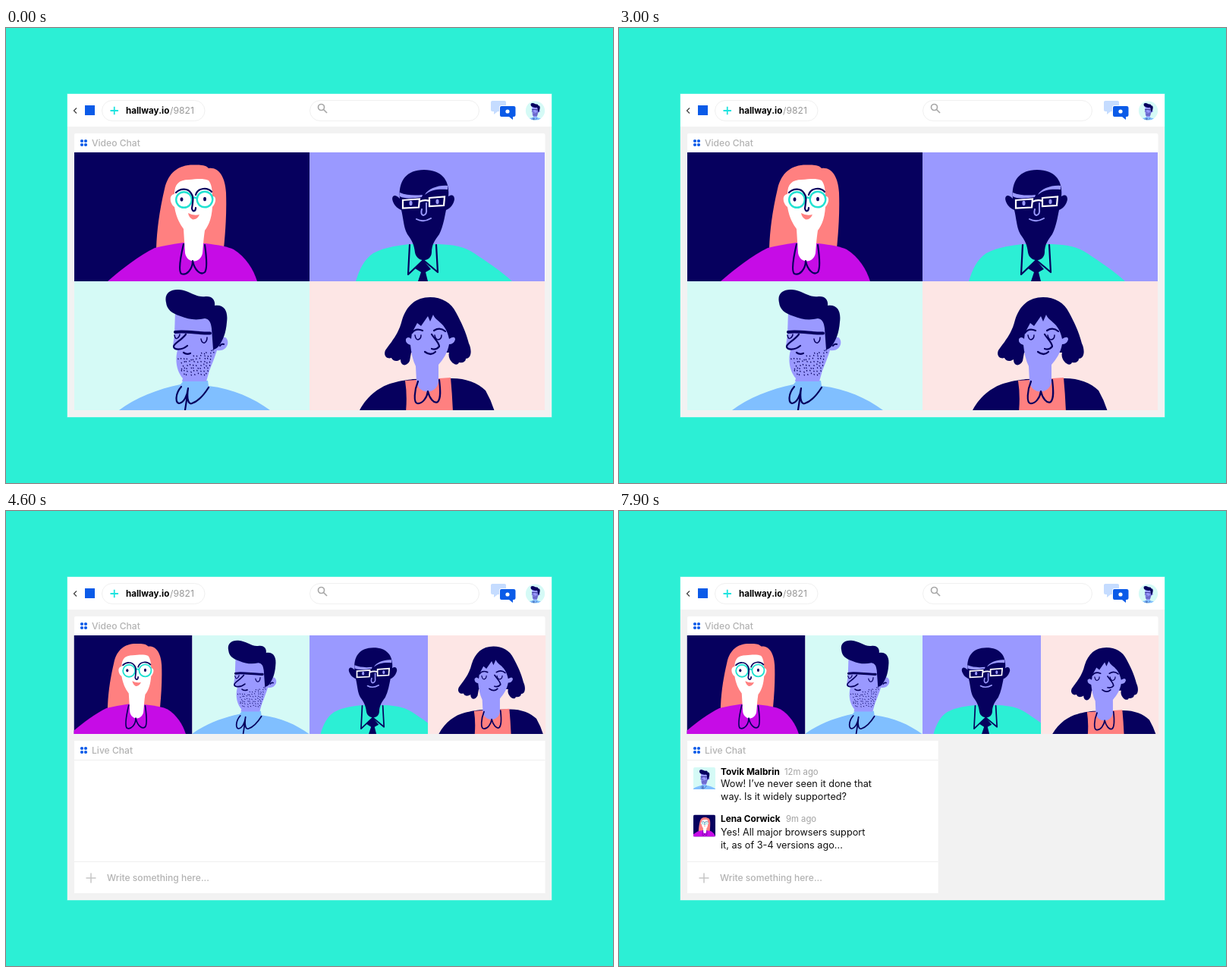
An HTML page that plays this animation: 800x600 px, repeating every 8000 ms.

```html
<!DOCTYPE html>
<html lang="en">
<head>
<meta charset="utf-8">
<title>Video and live chat</title>
<style>
  html, body { margin: 0; width: 100%; height: 100%; overflow: hidden; background: #2cefd5; }
  #stage { display: block; width: 800px; height: 600px; }
  text { font-family: Inter, "Open Sans", sans-serif; font-size: 12.7px; fill: #111; }
  .label { font-size: 12.1px; font-weight: 500; fill: #b3b3b3; }
  .name { font-size: 11.8px; font-weight: 700; fill: #000; }
  .time { font-size: 11.3px; fill: #a3a3a3; }
  .line { fill: none; stroke: #06005e; stroke-width: 2.2; stroke-linecap: round; stroke-linejoin: round; }
  .bold { stroke-width: 4; }
  .fine { stroke-width: 1.5; }
  .hairs { stroke-width: 1.2; }
  .navy { fill: #06005e; }
  .skin { fill: #9a99ff; }
</style>
</head>
<body>
<svg id="stage" viewBox="0 0 800 600">
  <defs>
    <clipPath id="round"><circle cx="697.5" cy="109" r="12.6"/></clipPath>
    <clipPath id="panelClip"><rect x="90" y="130" width="622" height="374"/></clipPath>
    <g id="dots" fill="#0b5be8">
      <circle cx="100" cy="149" r="2.1"/><circle cx="105" cy="149" r="2.1"/>
      <circle cx="100" cy="154" r="2.1"/><circle cx="105" cy="154" r="2.1"/>
    </g>

    <g id="redhead">
      <path fill="#ff8080" d="M198 291C199 262 203 238 209 212C214 190 228 180 248 180.500C257 180 264 181 267 185C280 183 289 196 290 217C291 245 289 270 287 291Z"/>
      <path fill="#c60ce6" d="M134 334C152 318 176 300 196 290Q213 286 234 283L262 284Q290 287 300 292C316 302 326 318 331 334Z"/>
      <path fill="#fff" d="M222 219C222 206 228 200 241 200C252 199 260 198 267 201C271 206 272 214 272 222C278 221 277 231 272 236C271 250 268 259 262 267C260 280 260 288 259 297C256 311 239 311 236 297L234 265C228 257 224 248 222 236C216 232 214 220 222 219Z"/>
      <path class="line" d="M234 285C230 302 227 320 231 324C238 327 246 318 246 307C248 318 256 327 262 322C266 317 264 300 262 286"/>
      <g id="specs">
        <path fill="none" stroke="#22e2d2" stroke-width="2.400" d="M245 225Q248 222 252 225"/>
        <g fill="#fff" stroke="#22e2d2" stroke-width="2.400">
          <circle cx="234.500" cy="226.500" r="10.300"/><circle cx="262" cy="226" r="10.300"/>
        </g>
        <path class="line" d="M224 217C230 211 240 211 244 218C248 223 246 230 245 238C246 243 250 242 250 237M250 220C253 210 266 210 271 216"/>
        <ellipse class="navy" cx="231.500" cy="226" rx="2" ry="2.700"/>
        <ellipse class="navy" cx="262" cy="225.500" rx="2" ry="2.700"/>
      </g>
      <path fill="#ff8080" d="M240 244Q247 248 255 246Q252 253 246 252.500Q241 250 240 244Z"/>
    </g>

    <g id="bald">
      <path fill="#2cefd5" d="M461 334C466 318 472 305 484 297C500 288 518 287 532 285H570C590 286 604 288 617 297C632 307 652 320 667 334Z"/>
      <path class="navy" d="M519 225C512 217 507 222 510 229C513 236 517 238 521 240C524 252 524 264 529 272C535 280 538 286 539 296C541 309 560 310 561 296C561 286 565 280 571 272C576 262 578 250 580 240C586 238 590 232 591 226C591 219 586 220 583 222C585 204 577 187 551 187C525 187 517 205 519 225Z"/>
      <path class="line" d="M532 286L530 325L550 306L569 322L567 286"/>
      <path class="navy" d="M539 317L550 306L560 318L553 322L556 334H543L547 322Z"/>
      <path class="skin" d="M519 217C528 221 540 221 549 220L548 223C538 224 526 226 519 222ZM552 220C556 212 570 207 582 208V213C570 212 560 213 552 220Z"/>
      <path fill="none" stroke="#fff" stroke-width="2.200" d="M523 227L545 225.500L544 236.500L523 237.500ZM558 224L578 222.500L577 234L558 235ZM545 229Q551 226 558 228"/>
      <ellipse class="skin" cx="533.500" cy="231" rx="2" ry="3.200"/>
      <ellipse class="skin" cx="568.500" cy="229" rx="2" ry="3.200"/>
      <g fill="none" stroke="#9a99ff" stroke-width="2" stroke-linecap="round">
        <path d="M548 239Q546 246 550 247Q555 246 554 239V231"/><path d="M541 252Q550 257 560 251"/>
      </g>
    </g>

    <g id="quiff">
      <path fill="#80bfff" d="M149 504C170 488 200 476 230 470L234 465H266L267 472C300 476 326 488 348 504Z"/>
      <path class="skin" d="M223 374L222 404L220 419Q219 424 226 425C222 440 226 454 233 462L232 466H264L268 452C272 442 276 432 278 425C290 427 295 416 291 410C289 406 284 408 281 413L276 378Z"/>
      <path class="navy" d="M211 362C208 349 218 344 228 345C242 346 250 356 263 354C272 353 276 359 275 366C288 364 293 374 291 388C290 402 286 412 280 420Q276 424 273 424L271 396C270 388 268 384 262 383C250 386 240 384 230 380C218 376 212 371 211 362Z"/>
      <path class="line" d="M282 419Q284 416 287 417"/>
      <path class="line bold" d="M223 401C236 399 255 403 269 402.500"/>
      <path class="line" d="M237 404C231 412 221 416 221 420C221 425 232 425 239 419"/>
      <path id="lids" class="line fine" d="M222 405Q223 411 226 409Q229 407 229 404M257 410Q258 416 262 415Q265 413 265 408"/>
      <path id="grin" class="line" d="M234 428Q238 431 243 429"/>
      <path id="stubble" class="line hairs"/>
      <path class="line" d="M231 473C223 482 223 494 228 495C235 494 239 484 240 475C238 488 240 497 245 495C254 492 262 482 267 474M239 484L236 504"/>
    </g>

    <g id="bob"><g id="dip">
      <path class="navy" d="M559 355C540 355 528 366 522 385C517 405 508 413 500 425C497 432 502 437 508 435C510 440 516 440 520 437C520 446 528 447 532 439L534 428H584C581 438 594 449 597 441C602 442 606 440 606 436C614 436 614 424 610 416C606 400 600 388 593 375C587 362 574 355 559 355Z"/>
      <path class="navy" d="M465 506C476 484 494 472 510 468C520 465 530 464 536 463L588 462C606 462 622 468 632 478Q640 492 644 506Z"/>
      <path fill="#ff8080" d="M526 465L586 461Q588 482 589 506H527Q529 484 526 465Z"/>
      <path class="skin" d="M535 402L542 389L547 393L556 380L559 387L563 378C566 387 580 388 584 410Q592 405 592 411Q590 417 584 417C582 428 577 436 570 444V466C568 484 543 484 541 466L540 446C536 438 534 428 533 418Q526 416 527 410Q530 406 534 410Z"/>
      <path class="line" d="M543 466C538 478 537 494 542 495C549 496 555 487 556 479C558 488 564 496 569 493C574 488 572 474 571 464"/>
      <path class="line" d="M535 402Q540 395 549 399M564 399Q572 394 579 400M561 404C565 410 571 415 571 420Q567 425 561 423M552 427Q560 433 566 427"/>
      <path class="line fine" d="M539 405Q540 411 543 411Q547 410 547 405M565 405Q566 411 570 411Q574 410 574 405"/>
    </g></g>
  </defs>

  <rect width="800" height="600" fill="#2cefd5"/>
  <rect x="81" y="87" width="638" height="426" fill="#f2f2f2" stroke="#fff" stroke-opacity=".4"/>
  <rect x="81" y="87" width="638" height="43" fill="#fff"/>

  <path d="M93 105.500L89.500 109L93 112.500" fill="none" stroke="#444" stroke-width="1.300"/>
  <rect x="104" y="102" width="13" height="13" fill="#0b5be8"/>
  <g fill="#fff" stroke="#f0f0f0">
    <rect x="126.500" y="95.500" width="135.500" height="27" rx="13.500"/>
    <rect x="400.500" y="95.500" width="223" height="27" rx="13.500"/>
  </g>
  <path d="M137.500 109H148M142.750 103.700V114.300" stroke="#1fe3df" stroke-width="1.800"/>
  <text class="name" style="font-size:11.600px" x="158" y="113">hallway.io</text>
  <text x="216" y="113" style="font-size:12.200px;fill:#999">/9821</text>
  <g fill="none" stroke="#a8a8a8" stroke-width="1.700"><circle cx="415.500" cy="104.500" r="4"/><path d="M418.500 107.500L423 112"/></g>
  <path fill="#c5dcff" d="M641 96H657Q659 96 659 98V110H648L643 114V110H641Q639 110 639 108V98Q639 96 641 96Z"/>
  <path fill="#0b5be8" stroke="#fff" stroke-width="2" paint-order="stroke" d="M653 103H669Q671.500 103 671.500 105V115Q671.500 117 669 117H668V121L663 117H653Q651 117 651 115V105Q651 103 653 103Z"/>
  <circle cx="661" cy="110" r="2.600" fill="#fff"/>
  <g clip-path="url(#round)">
    <rect x="684" y="96" width="27" height="27" fill="#d5faf6"/>
    <svg x="685" y="96.500" width="25" height="25" viewBox="167 328 166 166"><use href="#quiff"/></svg>
  </g>

  <path id="videoPanel" fill="#fff"/>
  <use href="#dots"/>
  <text class="label" x="113" y="156">Video Chat</text>
  <g id="tiles"></g>

  <g clip-path="url(#panelClip)">
    <rect id="chatPanel" x="90" fill="#fff"/>
    <g id="chatBody">
      <path id="rules" stroke="#efefef" fill="none"/>
      <use href="#dots" y="164"/>
      <text class="label" x="113" y="320">Live Chat</text>
      <path d="M105.500 484H118.500M112 477.500V490.500" stroke="#c6c6c6" stroke-width="1.500"/>
      <text class="label" x="133" y="488">Write something here...</text>
    </g>
    <g id="first">
      <svg x="98" y="338" width="29" height="29" viewBox="162 326 176 176"><rect x="162" y="326" width="176" height="176" rx="12" fill="#d5faf6"/><use href="#quiff"/></svg>
      <text class="name" x="134" y="347.500">Tovik Malbrin</text><text class="time" x="218" y="347.500">12m ago</text>
      <text x="134" y="364">Wow! I’ve never seen it done that</text>
      <text x="134" y="381">way. Is it widely supported?</text>
    </g>
    <g id="second">
      <svg x="98" y="400.500" width="29" height="29" viewBox="157 160 174 174"><rect x="157" y="160" width="174" height="174" rx="12" fill="#06005e"/><use href="#redhead"/></svg>
      <text class="name" x="134" y="410">Lena Corwick</text><text class="time" x="220" y="410">9m ago</text>
      <text x="134" y="427.500">Yes! All major browsers support</text>
      <text x="134" y="444.500">it, as of 3-4 versions ago...</text>
    </g>
  </g>
</svg>
<script>
const LOOP = 8000, SMALL = 0.775;
const $ = id => document.getElementById(id);
const set = (el, attrs) => { for (const k in attrs) el.setAttribute(k, attrs[k]); };
const make = (tag, parent, attrs) => {
  const el = document.createElementNS(stage.namespaceURI, tag);
  set(el, attrs);
  return parent.appendChild(el);
};
const stage = $('stage');
const lerp = (a, b, p) => a + (b - a) * p;
const ramp = (t, start, end) => Math.min(1, Math.max(0, (t - start) / (end - start)));
const ease = p => p < 0.5 ? 4 * p ** 3 : 1 - 4 * (1 - p) ** 3;
const between = (t, start, end) => ease(ramp(t, start, end));
// 0 at rest, 1 inside any of the given spans, with short soft edges
const pulse = (t, spans) => Math.max(...spans.map(([a, b]) =>
  between(t, a, a + 150) * (1 - between(t, b - 150, b))));

// from, to: top left of the tile; w: small width; dx, dy: where the small figure moves
const tiles = [
  { art: 'quiff', bg: '#d5faf6', from: [90, 334], to: [245.5, 164], w: 155, dx: 129.7, dy: -96.6 },
  { art: 'bob', bg: '#fde6e5', from: [400, 334], to: [555.5, 164], w: 156, dx: 209.2, dy: -96.6 },
  { art: 'redhead', bg: '#06005e', from: [90, 164], to: [89.5, 164], w: 156, dx: -19.6, dy: 35.2 },
  { art: 'bald', bg: '#9a99ff', from: [400, 164], to: [400, 164], w: 156, dx: 57.2, dy: 35.2 },
];
for (const tile of tiles) {
  tile.box = make('svg', $('tiles'), {});
  make('rect', tile.box, { width: '100%', height: '100%', fill: tile.bg });
  tile.figure = make('use', tile.box, { href: '#' + tile.art });
}

// Beard stubble: jittered rows of short strokes inside the jaw
let seed = 7;
const random = () => (seed = seed * 16807 % 2147483647) / 2147483647;
let stubble = '';
for (let y = 423; y < 458; y += 4) {
  for (let x = 224; x < 276; x += 4.4) {
    const px = x + random() * 3, py = y + random() * 2.5;
    const top = 434 - Math.max(0, px - 240) * 0.35;
    const left = 225 + (py - 430) * 0.25, right = 275 - (py - 424) * 0.28;
    if (py > top && px > left && px < right) stubble += `M${px.toFixed(1)} ${py.toFixed(1)}l.3 .7`;
  }
}
$('stubble').setAttribute('d', stubble);

const tilts = [[1000, 1650], [3000, 3550], [6000, 6450]];
const dips = [[1400, 1950], [2300, 2900], [4100, 4500], [5000, 5450], [6900, 7400], [7600, 8400]];
const blinks = [[500, 950], [1450, 1950], [2350, 2850], [3450, 3850], [4150, 4500], [5000, 5450], [5950, 6500], [6950, 7450]];

function draw(t) {
  const p = between(t, 3000, 3400);
  const height = lerp(170, 130, p), scale = lerp(1, SMALL, p);
  for (const { box, figure, from, to, w, dx, dy } of tiles) {
    const x = lerp(from[0], to[0], p), y = lerp(from[1], to[1], p);
    set(box, { x, y, width: lerp(310, w, p), height });
    set(figure, { transform: `translate(${dx * p - x} ${dy * p - y}) scale(${scale})` });
  }
  set($('videoPanel'), { d: `M90 ${164 + height}V141Q90 139 92 139H708.5Q710.5 139 710.5 141V${164 + height}Z` });

  const tilt = pulse(t, tilts), blink = pulse(t, blinks);
  set($('specs'), { transform: `rotate(${-6 * tilt} 248 226)` });
  set($('lids'), { transform: `translate(0 ${blink * 0.8})` });
  set($('grin'), { transform: `translate(0 ${blink * 0.8})` });
  set($('dip'), { transform: `translate(0 ${2 * pulse(t, dips)})` });

  const width = lerp(620.5, 312, between(t, 7600, 8000));
  const top = lerp(548, 303, p);
  set($('chatPanel'), { y: top, width, height: Math.max(0, 504 - top), opacity: p * p });
  set($('rules'), { d: `M90 328.5h${width}M90 462.5h${width}` });
  set($('chatBody'), { opacity: ramp(t, 3800, 4100) });

  set($('first'), {
    opacity: ramp(t, 5000, 5250),
    transform: `translate(0 ${lerp(70.5, 0, between(t, 5850, 6250))})`,
  });
  set($('second'), { opacity: ramp(t, 6100, 6350) });
}

function frame() {
  draw(performance.now() % LOOP);
  requestAnimationFrame(frame);
}
frame();
</script>
</body>
</html>
```
